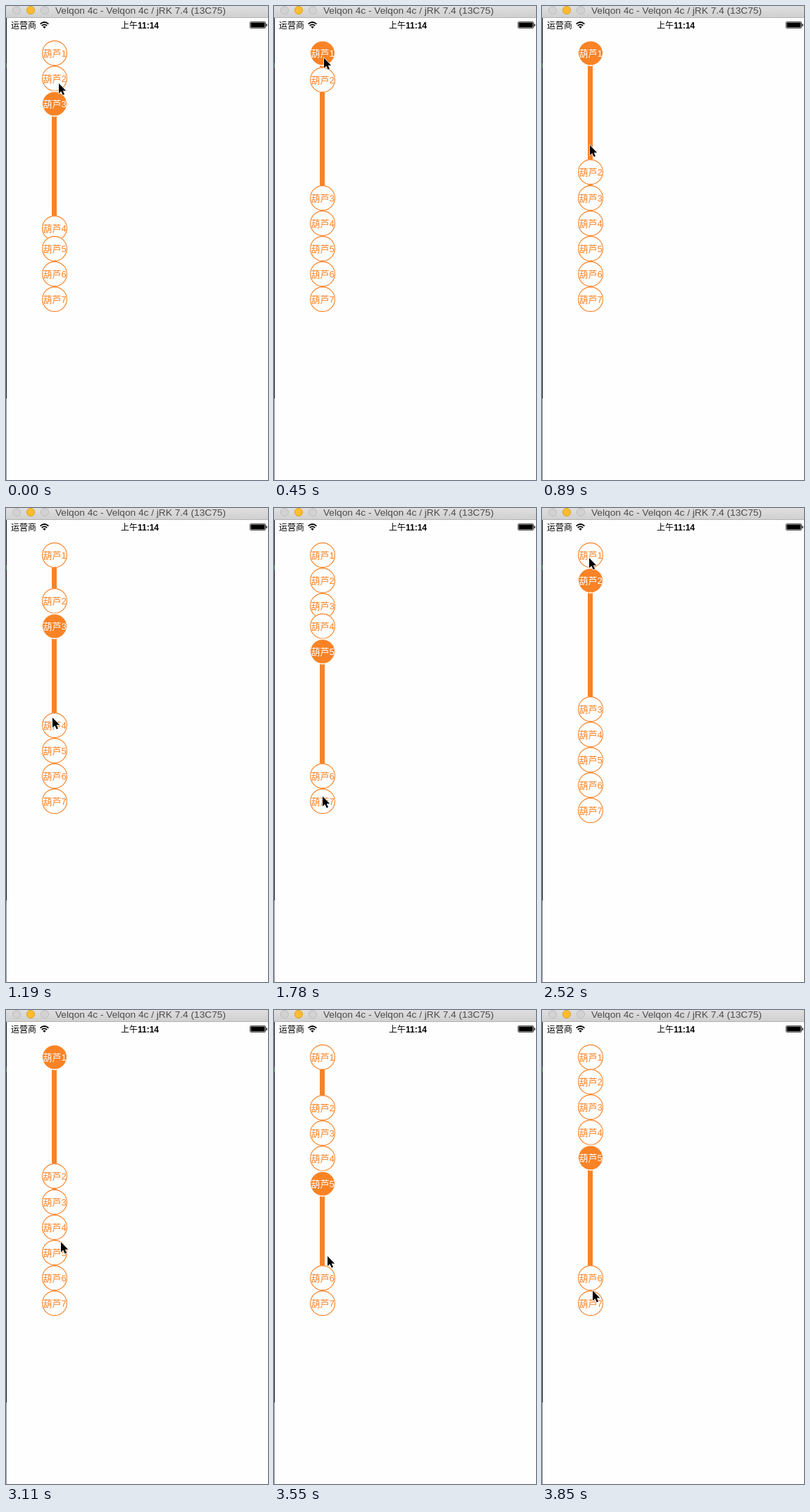
Write an HTML page that moves like this. It is 372x674 px and loops after 3950 ms.

```html
<!DOCTYPE html>
<html lang="zh">
<meta charset="utf-8">
<style>
  html, body { margin: 0; width: 100%; height: 100%; overflow: hidden; background: #fefefe; }
  svg { display: block; font-family: "Liberation Sans", "Noto Sans CJK SC", "Noto Sans CJK", sans-serif; }
  .bar { fill: #f98326; }
  .item circle { fill: #fefefe; stroke: #f98326; stroke-width: 1.1; }
  .item text { fill: #f98326; font-size: 13px; font-weight: 300; text-anchor: middle; }
  .item .base { stroke: none; }
  .item.on circle { fill: #f98326; stroke: #fefefe; }
  .item.on text { fill: #fefefe; }
</style>
<body>
<svg id="stage" width="372" height="674" viewBox="0 0 372 674">
  <defs>
    <linearGradient id="chrome" x2="0" y2="1">
      <stop stop-color="#dfdfdf"/><stop offset="1" stop-color="#d0d0d0"/>
    </linearGradient>
  </defs>
  <rect width="372" height="674" fill="#fefefe"/>
  <path d="M.5 16V558" stroke="#151515"/>
  <path d="M.5 81v7" stroke="#285c2c"/>
  <path d="M.5 558V674" stroke="#929292"/>
  <rect width="372" height="16" fill="url(#chrome)"/>
  <path d="M0 16.5H372" stroke="#b3b3b3"/>
  <g stroke="#bdbdbd" fill="#d2d2d2">
    <circle cx="15" cy="6" r="5.6"/>
    <circle cx="35" cy="6" r="5.6" fill="#fdbd2f" stroke="#dfa023"/>
    <circle cx="55" cy="6" r="5.6"/>
  </g>
  <text x="70" y="11" font-size="13.7" fill="#4b4b4b">Velqon 4c - Velqon 4c / jRK 7.4 (13C75)</text>
  <text x="7" y="32" font-size="12">运营商</text>
  <g fill="none" stroke="#000" stroke-width="1.7">
    <path d="M48.6 25.6Q54.5 20.4 60.4 25.6M50.8 28Q54.5 24.8 58.2 28"/>
    <path d="M54.5 32l-2.2-2.4q2.2-1.6 4.4 0z" fill="#000" stroke="none"/>
  </g>
  <text x="163" y="31.5" font-size="12" font-weight="500">上午<tspan font-weight="700">11:14</tspan></text>
  <rect x="346.5" y="22.5" width="22" height="9" rx="1.5" fill="#fefefe" stroke="#000" stroke-width=".7"/>
  <rect x="347.5" y="23.5" width="20" height="7" rx=".7"/>
  <rect x="369.3" y="25.3" width="1.4" height="3.6" rx=".7"/>
  <g id="bars"></g>
  <g id="items"></g>
  <path id="cursor" d="M0 0V14.2L3.3 11.2 5.7 16.6 8 15.6 5.7 10.4H10.2Z" stroke="#fff" stroke-width="1.2" paint-order="stroke"/>
</svg>
<script>
const LOOP = 3950, COUNT = 7, SIZE = 36, TRAVEL = 134;
const SHORT_STEPS = [5, 8, 14, 19, 21];
// [time, selected index]
const CLICKS = [[-337, 2], [20, 1], [439, 0], [1060, 2], [1443, 4], [1830, 6], [2257, 1], [2640, 0], [3428, 4]];
// [time, x, y]
const POINTER = [
  [0, 75, 110], [450, 71, 74], [600, 70, 72], [1060, 67, 272], [1190, 66, 298], [1443, 68, 340],
  [1780, 69, 410], [1850, 70, 409], [2075, 80, 250], [2257, 72, 100], [2520, 67, 71],
  [2640, 67, 71], [3110, 78, 330], [3428, 78, 330], [3850, 72, 399]
];

const byId = id => document.getElementById(id);
const bars = [], items = [];
for (let i = 0; i < COUNT; i++) {
  byId('items').insertAdjacentHTML('beforeend',
    `<g class="item"><circle class="base" r="18"/><circle r="17.4"/><text y="4.7">葫芦${i + 1}</text></g>`);
  items.push(byId('items').lastElementChild);
  if (i < COUNT - 1) {
    byId('bars').insertAdjacentHTML('beforeend', '<rect class="bar" x="65" width="7"/>');
    bars.push(byId('bars').lastElementChild);
  }
}

function heldTime(t) {
  let start = 0;
  for (let n = 0; ; n++) {
    const next = start + (SHORT_STEPS.includes(n) ? 140 : 150);
    if (next > t) return start;
    start = next;
  }
}

// Underdamped step response, about 10% overshoot.
function spring(ms) {
  if (ms <= 0) return 0;
  const s = ms / 1000, decay = 9.2, freq = 12.3;
  return 1 - Math.exp(-decay * s) * (Math.cos(freq * s) + decay / freq * Math.sin(freq * s));
}

function itemY(i, t) {
  let selected = 3, y = 67 + SIZE * i + (i > selected ? TRAVEL : 0);
  for (const [at, next] of CLICKS) {
    y += TRAVEL * ((i > next) - (i > selected)) * spring(t - at);
    selected = next;
  }
  return Math.round(y);
}

function pointerAt(t) {
  const k = Math.max(1, POINTER.findIndex(p => p[0] >= t));
  const [t0, x0, y0] = POINTER[k - 1], [t1, x1, y1] = POINTER[k];
  const f = (t - t0) / (t1 - t0);
  return [x0 + (x1 - x0) * f, y0 + (y1 - y0) * f].map(Math.round);
}

function draw() {
  const t = heldTime(performance.now() % LOOP);
  const selected = CLICKS.filter(c => c[0] <= t).pop()[1];
  const ys = items.map((_, i) => itemY(i, t));
  items.forEach((el, i) => {
    el.setAttribute('transform', `translate(69 ${ys[i]})`);
    el.classList.toggle('on', i === selected);
  });
  bars.forEach((el, i) => {
    el.setAttribute('y', ys[i] + SIZE / 2);
    el.setAttribute('height', Math.max(0, ys[i + 1] - ys[i] - SIZE));
  });
  byId('cursor').setAttribute('transform', `translate(${pointerAt(t)})`);
  requestAnimationFrame(draw);
}
draw();
</script>
</body>
</html>
```
